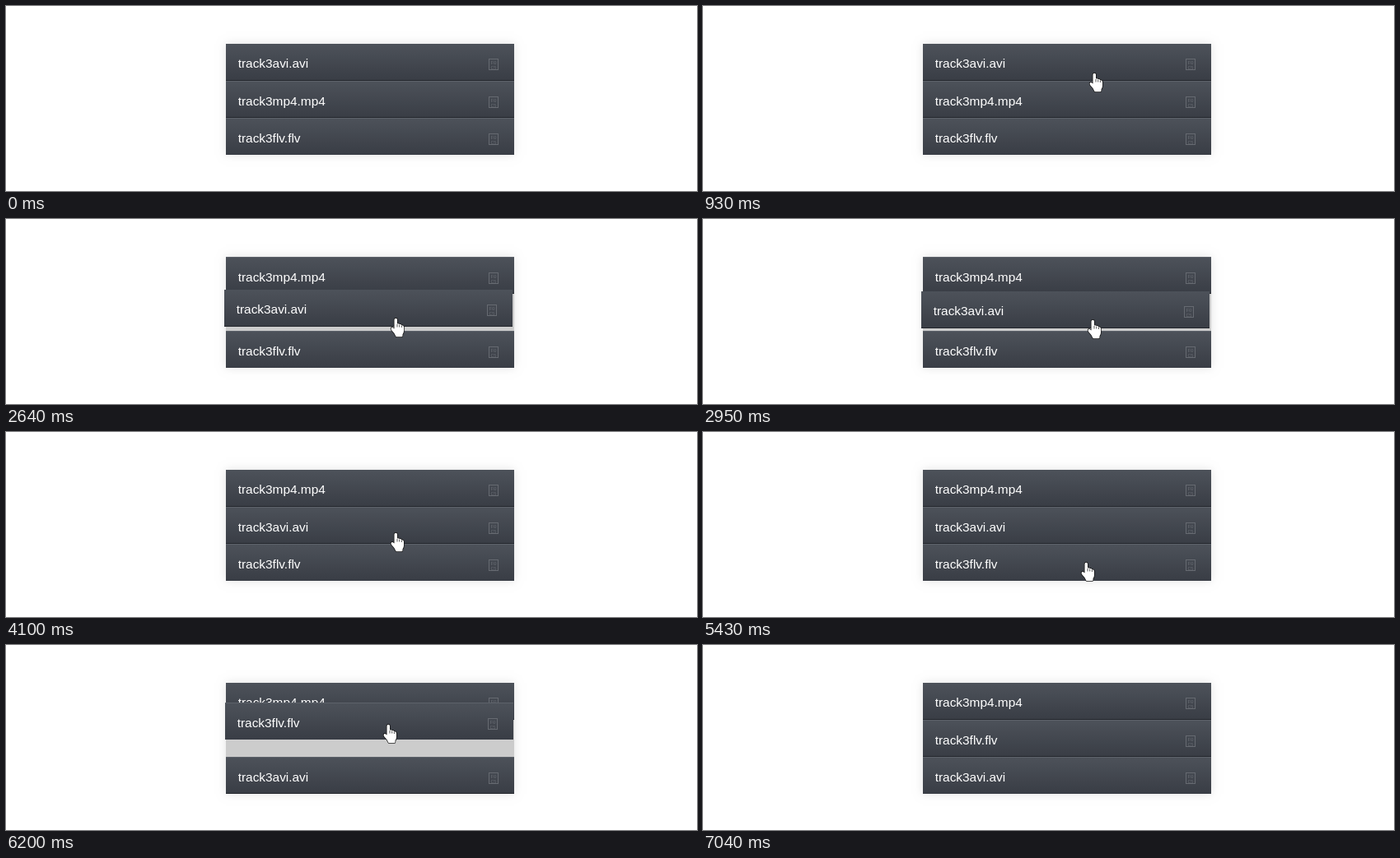
Recreate the animation shown at these times as an HTML page with a canvas. Size 839 by 225 pixels, loop 8 s.

```html
<!DOCTYPE html>
<html lang="en">
<head>
<meta charset="utf-8">
<title>Sortable list</title>
<style>
  html, body { margin: 0; width: 100%; height: 100%; overflow: hidden; background: #fff; }
  canvas { display: block; }
</style>
</head>
<body>
<canvas id="stage" width="839" height="225"></canvas>
<script>
const ctx = document.getElementById('stage').getContext('2d');
const LOOP = 8000, TICK = 75;
const LEFT = 267, TOP = 46, ROW_W = 350, ROW_H = 45;

const easeOut = power => p => 1 - (1 - p) ** power;
const smooth = p => p * p * p * (p * (6 * p - 15) + 10);

// Pointer strokes, each starting where the previous one ended; `bow` bends the path sideways
const ENTER = 780, LEAVE = 7040;
const origin = { x: 500, y: 99 };
const strokes = [
  { at: ENTER, ticks: 3, x: 468, y: 81, ease: easeOut(2) },
  { at: 2110, ticks: 1, x: 468, y: 80 },
  { at: 2330, ticks: 9, x: 466, y: 122, ease: easeOut(3.85), bow: -2 },
  { at: 4320, ticks: 3, x: 458, y: 161, ease: easeOut(2) },
  { at: 4980, ticks: 1, x: 458, y: 162 },
  { at: 5430, ticks: 5, x: 457, y: 97, ease: smooth, bow: -11 },
  { at: 6200, ticks: 1, x: 457, y: 96 },
  { at: 6740, ticks: 4, x: 482, y: 124, ease: smooth }
];

// A pressed row follows the pointer once it has travelled far enough
const TRAVEL = 5;
const drags = [
  { press: 2200, drop: 4100, from: 0, to: 1 },
  { press: 5300, drop: 6660, from: 2, to: 1 }
];

const hand = new Path2D('M5.5 2.5Q5.5 .8 7.3 .8Q9 .8 9 2.5V7.5Q10.5 7 12 8Q13.6 7.8 14.4 9.2Q17 9 17 11.5V16' +
  'Q17 18.5 15.5 20.5V22Q15.5 23.2 14 23.2H8.5Q7.3 23.2 7 22Q5.5 18.5 2 15Q.8 12.8 2.4 12Q4 11.6 5.5 13.5Z');
const knuckles = new Path2D('M9 8V11.5M11.7 8.5V11.5M14.4 9.5V12');

function pointerAt(t) {
  const i = strokes.findLastIndex(s => s.at <= t);
  const { at, ticks, x, y, ease = smooth, bow = 0 } = strokes[i];
  const start = strokes[i - 1] || origin;
  const p = Math.min(1, (Math.floor((t - at) / TICK) + 1) / ticks);
  const e = ease(p);
  return {
    x: Math.round(start.x + (x - start.x) * e + bow * Math.sin(Math.PI * e) ** 2),
    y: Math.round(start.y + (y - start.y) * e)
  };
}

function fill(color, x, y, w, h) {
  ctx.fillStyle = color;
  ctx.fillRect(x, y, w, h);
}

function write(text, x, y, font, color) {
  ctx.font = font;
  ctx.fillStyle = color;
  ctx.fillText(text, x, y);
}

function drawRow(type, x, y, first, last) {
  const shade = ctx.createLinearGradient(0, y, 0, y + ROW_H);
  shade.addColorStop(0, '#4d525a');
  shade.addColorStop(1, '#393d45');
  fill(shade, x, y, ROW_W, ROW_H);
  if (!first) fill('#5d626a', x, y, ROW_W, 1);
  if (!last) fill('#24272d', x, y + ROW_H - 1, ROW_W, 1);

  const top = first ? y : y + 1;
  write(`track3${type}.${type}`, x + 14.7, top + 29, '15.4px "Liberation Sans", Arial, sans-serif', '#fff');

  ctx.strokeStyle = '#666a71';
  ctx.lineWidth = 1;
  ctx.strokeRect(x + 319.5, top + 18.5, 11, 13);
  const tiny = '6px "Liberation Mono", monospace';
  write('F0', x + 321.5, top + 24.5, tiny, '#666a71');
  write('C5', x + 321.5, top + 30.5, tiny, '#666a71');
}

function drawPointer({ x, y }) {
  ctx.save();
  ctx.translate(x, y);
  ctx.strokeStyle = '#111';
  ctx.fillStyle = '#fff';
  ctx.lineWidth = 1.4;
  ctx.stroke(hand);
  ctx.fill(hand);
  ctx.lineWidth = 0.7;
  ctx.stroke(knuckles);
  ctx.restore();
}

function move(list, from, to) {
  const copy = [...list];
  copy.splice(to, 0, ...copy.splice(from, 1));
  return copy;
}

// Neighbours give way after two thirds of a row
const slotShift = dy => Math.trunc(dy / ROW_H + Math.sign(dy) / 3);

function draw(t) {
  fill('#fff', 0, 0, 839, 225);
  ctx.save();
  ctx.shadowColor = 'rgba(0,0,0,.12)';
  ctx.shadowBlur = 10;
  fill('#ccc', LEFT, TOP, ROW_W, ROW_H * 3);
  ctx.restore();

  let order = ['avi', 'mp4', 'flv'];
  for (const d of drags) if (t >= d.drop) order = move(order, d.from, d.to);
  const row = (type, x, y) => drawRow(type, x, y, type === order[0], type === order[2]);

  const visible = t >= ENTER && t < LEAVE;
  const pointer = visible && pointerAt(t);
  const drag = drags.find(d => t >= d.press && t < d.drop);
  let dx = 0, dy = 0;
  if (drag) {
    const grab = pointerAt(drag.press);
    dx = pointer.x - grab.x;
    dy = pointer.y - grab.y;
    if (Math.hypot(dx, dy) < TRAVEL) dx = dy = 0;
  }

  const held = drag && order[drag.from];
  const slots = drag ? move(order, drag.from, drag.from + slotShift(dy)) : order;
  slots.forEach((type, i) => {
    if (type !== held) row(type, LEFT, TOP + i * ROW_H);
  });
  if (drag) row(held, LEFT + dx, TOP + drag.from * ROW_H + dy);
  if (visible) drawPointer(pointer);
}

const began = performance.now();
function tick() {
  draw((performance.now() - began) % LOOP);
  requestAnimationFrame(tick);
}
tick();
</script>
</body>
</html>
```
